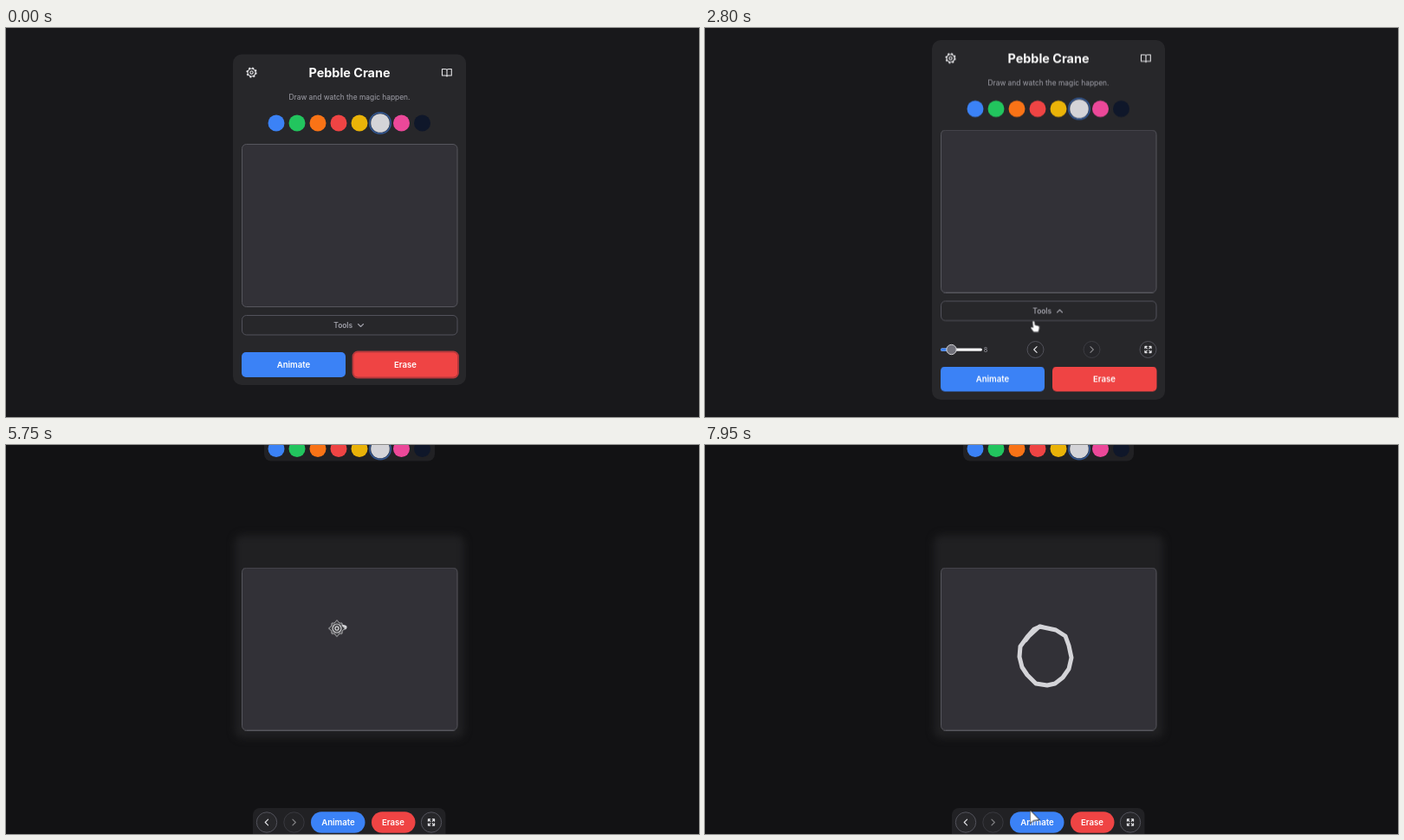
Recreate the animation shown at these times as an HTML page. Size 800 px wide and 450 px high, loop 8000 ms.

```html
<!DOCTYPE html>
<html lang="en">
<head>
<meta charset="utf-8">
<title>Pebble Crane</title>
<style>
  :root {
    --loop: 8s;
    --doodle: path("M391 211L387 210L380 213L372 222L364 233L363 245L366 257L372 266L382 276L395 278L404 276L413 269L420 259L423 246L420 232L416 221L405 214L391 211L386 210L374 221L370 226");
  }
  html, body { margin: 0; width: 100%; height: 100%; overflow: hidden; background: #18181b; }
  svg { display: block; width: 100vw; height: 100vh; }
  text { font-family: Inter, sans-serif; font-size: 8.4px; fill: #a1a1aa; }
  .mid { text-anchor: middle; }
  .title { font-size: 14.4px; font-weight: 700; fill: #fafafa; }
  .label { font-size: 9.6px; font-weight: 600; fill: #fff; text-anchor: middle; }
  .line { fill: none; stroke: #e4e4e7; stroke-width: 1.1; stroke-linecap: round; stroke-linejoin: round; }
  .edge { fill: none; stroke: #52525b; }
  .round { fill: #27272a; stroke: #52525b; }
  .blue { fill: #3b82f6; }
  .red { fill: #ef4444; }

  .anim, .anim * { animation-duration: var(--loop); animation-iteration-count: infinite; }

  /* Page and panel */
  .page { animation-name: page; }
  @keyframes page { 0%, 51% { fill: #18181b; } 57%, 100% { fill: #121214; } }
  .panel { fill: #27272a; animation-name: panel, leave; }
  @keyframes panel {
    0%, 29.4% { y: 30.5px; height: 382.5px; }
    33.5%, 42.2% { y: 14px; height: 416px; }
    48.5%, 100% { y: 103px; height: 237px; }
  }
  @keyframes leave { 0%, 51% { opacity: 1; } 57%, 100% { opacity: 0; } }
  .glow { fill: #202022; filter: blur(4px); animation-name: arrive; }
  @keyframes arrive { 0%, 51% { opacity: 0; } 57%, 100% { opacity: 1; } }

  .upper { animation-name: rise, vanish; }
  .lower { animation-name: sink, vanish; }
  .board { animation-name: board; }
  @keyframes rise {
    0%, 29.4% { transform: translateY(0); }
    33.5%, 100% { transform: translateY(-16.5px); }
  }
  @keyframes sink {
    0%, 29.4% { transform: translateY(0); }
    33.5%, 100% { transform: translateY(16.5px); }
  }
  @keyframes board {
    0%, 29.4% { transform: translateY(0); }
    33.5%, 42.2% { transform: translateY(-16.5px); }
    48.5%, 100% { transform: translateY(7.5px); }
  }
  @keyframes vanish { 0%, 42.2% { opacity: 1; } 45.5%, 100% { opacity: 0; } }
  .controls { animation-name: controls; }
  @keyframes controls {
    0%, 30% { opacity: 0; }
    33.5%, 42.2% { opacity: 1; }
    45.5%, 100% { opacity: 0; }
  }
  .focus { fill: none; stroke: #b8393c; stroke-width: 1.8; animation-name: focus; }
  @keyframes focus { 0%, 29.4% { opacity: 1; } 30.5%, 100% { opacity: 0; } }
  .flip { transform-origin: 409.5px 344px; animation-name: flip; }
  @keyframes flip { 0%, 29.4% { transform: none; } 32%, 100% { transform: scaleY(-1); } }

  /* Floating bars */
  .topbar { animation-name: drop; }
  .bottombar { animation-name: lift; }
  @keyframes drop { 0%, 50.6% { transform: translateY(-26px); } 55.5%, 100% { transform: none; } }
  @keyframes lift { 0%, 50.6% { transform: translateY(34px); } 55.5%, 100% { transform: none; } }

  /* Drawing */
  .stroke {
    d: var(--doodle); fill: none; stroke: #d4d4d8; stroke-width: 5;
    stroke-linecap: round; stroke-linejoin: round; stroke-dasharray: 100 200;
    animation-name: ink, inked; animation-timing-function: linear, step-end;
  }
  @keyframes ink {
    0%, 71.2% { stroke-dashoffset: 100; }
    71.9% { stroke-dashoffset: 95.7; }
    73.1% { stroke-dashoffset: 92; }
    83.1% { stroke-dashoffset: 26; }
    88.75% { stroke-dashoffset: 3; }
    90%, 100% { stroke-dashoffset: 0; }
  }
  @keyframes inked { 0% { opacity: 0; } 71.2%, 100% { opacity: 1; } }
  .pen {
    offset-path: var(--doodle); offset-rotate: 0deg; offset-anchor: 0 0;
    animation-name: pen, penShown; animation-timing-function: linear, step-end;
  }
  @keyframes pen {
    0%, 71.2% { offset-distance: 0%; }
    71.9% { offset-distance: 4.3%; }
    73.1% { offset-distance: 8%; }
    83.1% { offset-distance: 74%; }
    88.75% { offset-distance: 97%; }
    90%, 100% { offset-distance: 100%; }
  }
  @keyframes penShown { 0% { opacity: 0; } 71.2% { opacity: 1; } 90%, 100% { opacity: 0; } }

  /* Pointer */
  .pointer { animation-name: travel; animation-timing-function: ease-in-out; }
  @keyframes travel {
    0%, 8.8% { transform: translate(-14px, 388px); }
    15% { transform: translate(262px, 352px); }
    20% { transform: translate(224px, 338px); }
    21.5% { transform: translate(211px, 342px); }
    28.5%, 35.5% { transform: translate(379.5px, 338.5px); }
    41.2% { transform: translate(511px, 370px); }
    48%, 52% { transform: translate(513px, 373px); }
    62.5% { transform: translate(414px, 266px); }
    66.5% { transform: translate(376px, 211px); }
    70%, 71.2% { transform: translate(391px, 211px); }
    71.3%, 90% { transform: translate(370px, 226px); }
    93.75% { transform: translate(380px, 296px); }
    96.5% { transform: translate(418px, 350px); }
    97.8% { transform: translate(418px, 392px); }
    99.2%, 100% { transform: translate(374.5px, 421.5px); }
  }
  .pointer > * { animation-timing-function: step-end; }
  .arrow { animation-name: arrow; }
  .hand { animation-name: hand; }
  .aim { animation-name: aim; }
  .bigArrow { animation-name: bigArrow; }
  @keyframes arrow {
    0% { opacity: 1; } 26% { opacity: 0; } 36.5% { opacity: 1; }
    40.4% { opacity: 0; } 43.5% { opacity: 1; } 56.5%, 100% { opacity: 0; }
  }
  @keyframes hand {
    0% { opacity: 0; } 26% { opacity: 1; } 36.5% { opacity: 0; }
    40.4% { opacity: 1; } 43.5%, 100% { opacity: 0; }
  }
  @keyframes aim {
    0% { opacity: 0; } 56.5% { opacity: 1; } 71.2% { opacity: 0; }
    90% { opacity: 1; } 95.4%, 100% { opacity: 0; }
  }
  @keyframes bigArrow { 0% { opacity: 0; } 95.4%, 100% { opacity: 1; } }
</style>
</head>
<body>
<svg viewBox="0 0 800 450" class="anim">
  <defs>
    <g id="swatches">
      <circle cx="-84" r="9.5" fill="#3b82f6"/>
      <circle cx="-60" r="9.5" fill="#22c55e"/>
      <circle cx="-36" r="9.5" fill="#f97316"/>
      <circle cx="-12" r="9.5" fill="#ef4444"/>
      <circle cx="12" r="9.5" fill="#eab308"/>
      <circle cx="36" r="12.2" fill="#1d2535" stroke="#33568f" stroke-width="1.7"/>
      <circle cx="36" r="10.8" fill="#d4d4d8"/>
      <circle cx="60.5" r="9.5" fill="#ec4899"/>
      <circle cx="84.5" r="9.5" fill="#0f172a"/>
    </g>
    <path id="corner" d="M-3.6-1.3V-3.6H-1.3M-3.6-3.6L-1.2-1.2"/>
    <g id="expand" class="line">
      <use href="#corner"/>
      <use href="#corner" transform="rotate(90)"/>
      <use href="#corner" transform="rotate(180)"/>
      <use href="#corner" transform="rotate(270)"/>
    </g>
    <path id="back" class="line" d="M1.6-3.4L-1.8 0L1.6 3.4"/>
    <g id="target" fill="none" stroke-linejoin="round">
      <path d="M0-9.5L3-6L6-6L6-3L9.5 0L6 3L6 6L3 6L0 9.5L-3 6L-6 6L-6 3L-9.5 0L-6-3L-6-6L-3-6Z" fill="#39393d" stroke="#b9b9bb"/>
      <circle r="5" stroke="#d6d6d8" stroke-width="1.2"/>
      <circle r="2.1" stroke="#e4e4e6" stroke-width="1.2"/>
    </g>
  </defs>

  <rect class="page" width="800" height="450"/>
  <rect class="glow" x="264" y="104" width="265" height="235" rx="9"/>
  <rect class="panel" x="262" width="269" rx="10"/>

  <g class="upper">
    <g class="line" transform="translate(283.5 51.5)">
      <circle r="4.5"/>
      <circle r="5.4" stroke-width="1.5" stroke-linecap="butt" stroke-dasharray="2.12 2.12"/>
      <circle r="1.7"/>
    </g>
    <text class="mid title" x="396.5" y="57.2">Pebble Crane</text>
    <path class="line" d="M509 48.8V56M503.5 47.5H507Q509 47.5 509 49Q509 47.5 511 47.5H514.3V55H510.5Q509 55 509 56Q509 55 507.5 55H503.5Z"/>
    <text class="mid" x="396.5" y="83">Draw and watch the magic happen.</text>
    <use href="#swatches" x="396" y="110"/>
    <rect class="edge" x="272.5" y="332.5" width="248.5" height="22.5" rx="5"/>
    <text x="378.3" y="347" font-weight="600">Tools</text>
    <path class="line flip" style="stroke:#a1a1aa" d="M406.5 342.5L409.5 345.5L412.5 342.5"/>
  </g>

  <rect class="board" x="272.5" y="134.5" width="248.5" height="188" rx="5" fill="#323137" stroke="#56565d"/>

  <g class="controls">
    <rect x="272" y="370.5" width="48" height="3.2" rx="1.6" fill="#f4f4f5"/>
    <rect class="blue" x="272" y="370.5" width="12" height="3.2" rx="1.6"/>
    <circle cx="284.5" cy="372" r="5.7" fill="#71717a" stroke="#d4d4d8"/>
    <text x="321.8" y="374.8" style="font-size:7.2px">8</text>
    <g transform="translate(381.5 372)"><circle class="round" r="9.5"/><use href="#back"/></g>
    <g transform="translate(446.5 372) scale(-1 1)" opacity=".5"><circle class="round" r="9.5"/><use href="#back"/></g>
    <g transform="translate(511.5 372)"><circle class="round" r="9.5"/><use href="#expand"/></g>
  </g>

  <g class="lower">
    <rect class="blue" x="272" y="375" width="120" height="29" rx="5"/>
    <text class="label" x="332" y="393">Animate</text>
    <rect class="red" x="401" y="375" width="120.5" height="29" rx="5"/>
    <rect class="focus" x="400.5" y="374.5" width="121.5" height="30" rx="5.5"/>
    <text class="label" x="461" y="393">Erase</text>
  </g>

  <g class="topbar">
    <rect x="298" y="-20" width="197" height="38.5" rx="8" fill="#212124"/>
    <use href="#swatches" x="396" y="4.5"/>
  </g>
  <g class="bottombar">
    <rect x="285" y="420" width="222.5" height="44" rx="8" fill="#212124"/>
    <g transform="translate(301 436.5)"><circle class="round" r="11.7"/><use href="#back"/></g>
    <g transform="translate(332.5 436.5) scale(-1 1)" opacity=".5"><circle class="round" r="11.7"/><use href="#back"/></g>
    <rect class="blue" x="352" y="424.3" width="62.5" height="24.4" rx="12.2"/>
    <text class="label" x="383.5" y="440">Animate</text>
    <rect class="red" x="422" y="424.3" width="50.5" height="24.4" rx="12.2"/>
    <text class="label" x="447" y="440">Erase</text>
    <g transform="translate(491 436.5)"><circle class="round" r="11.7"/><use href="#expand"/></g>
  </g>

  <path class="stroke" pathLength="100"/>
  <g class="pen"><use href="#target"/></g>

  <g class="pointer">
    <path class="arrow" d="M.4.4V12L9 7.4Z" fill="#fff" stroke="#0c0c0e" stroke-width=".6" stroke-linejoin="round"/>
    <path class="hand" d="M-1.6 1.2Q-.3-.8 1 1.2L1.6 5L5 5.8Q6.8 6.3 6.6 8L5.6 13.2H-.2L-3.6 8.6Q-3.6 6.9-1.8 7.5L-.8 8.1Z" fill="#fff" stroke="#18181b" stroke-width=".6" stroke-linejoin="round"/>
    <g class="aim"><use href="#target"/></g>
    <path class="bigArrow" d="M.6.6V16.5L4.6 13.2L11.8 12.2Z" fill="#fff" stroke="#18181b" stroke-linejoin="round"/>
  </g>
</svg>
</body>
</html>
```
